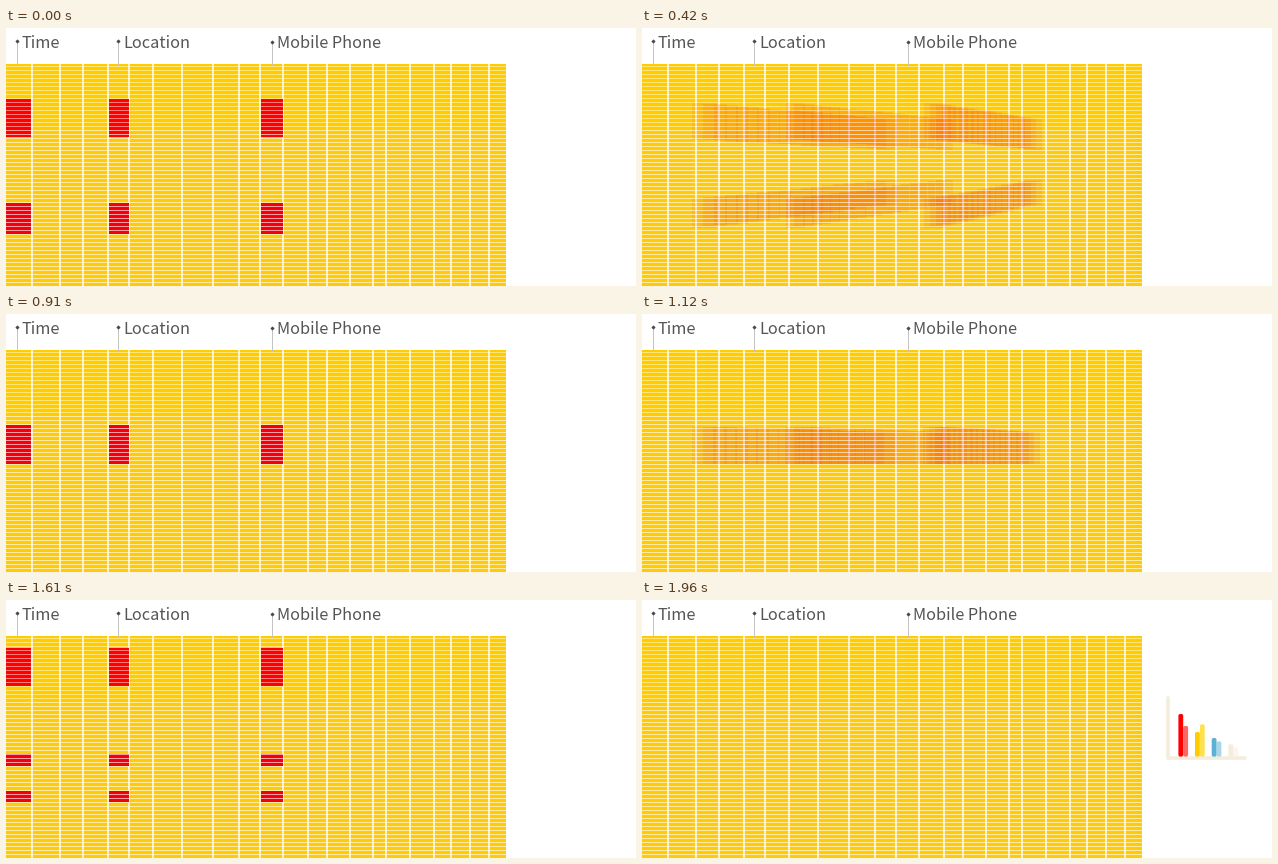
A matplotlib script that plays this animation: 630x258 px, repeating every 2240 ms.

```python
import numpy as np
import matplotlib.pyplot as plt
from matplotlib.animation import FuncAnimation
from matplotlib.patches import Circle, FancyBboxPatch, Rectangle, Wedge

W, H, DPI = 630, 258, 100
PX = 72 / DPI
YELLOW, RED, BLUE, BEIGE = "#ffcc00", "#ff0000", "#5bb1d6", "#f4ecdc"
TABLE_W, TABLE_TOP, SPLIT = 500, 36, 101

COLUMNS = [26, 54, 77, 102, 123, 147, 176, 207, 233, 254, 277,
           302, 321, 344, 367, 380, 404, 428, 445, 464, 483]
FIELDS = [(0, 25.4), (102.5, 122.6), (254.5, 276.5)]
LABELS = [("Time", 11, 12.5, 17), ("Location", 112, 12.5, 118),
          ("Mobile Phone", 266, 13.5, 272)]

fig = plt.figure(figsize=(W / DPI, H / DPI), dpi=DPI, facecolor="white")
ax = fig.add_axes([0, 0, 1, 1])
ax.set_xlim(0, W)
ax.set_ylim(H, 0)
ax.axis("off")


def rect(x0, y0, x1, y1, color, alpha=1, z=1):
    return ax.add_patch(Rectangle((x0, y0), x1 - x0, y1 - y0, fc=color,
                                  ec="none", lw=0, alpha=alpha, zorder=z))


def stroke(points, color, width):
    x, y = zip(*points)
    return ax.plot(x, y, color=color, lw=width * PX, zorder=5,
                   solid_capstyle="round", solid_joinstyle="round")[0]


def axes_lines():
    return [stroke([(525.5, 97.5), (525.5, 158.3), (603, 158.3)], BEIGE, 3.6)]


def line_chart():
    return axes_lines() + [
        stroke([(536, 147), (551, 127.5), (561, 134.5), (579, 119.5),
                (586, 123), (600, 123)], YELLOW, 4),
        stroke([(535, 122.5), (544.5, 123.5), (552.5, 142.5), (567, 143.5),
                (575.5, 138.5), (583.5, 142), (589, 135.5), (601, 139)], BLUE, 4),
        stroke([(534, 110.3), (563, 110.8), (568, 114), (575.5, 107.3),
                (580, 111), (594, 111), (600, 106.3)], RED, 4),
    ]


def donut_chart():
    center, radius = (560, 138.4), 35.5
    slices = [(-90, 37.5, RED), (37.5, 180, YELLOW), (180, 270, BEIGE)]
    parts = [Wedge(center, radius, a, b, fc=c, ec="none", zorder=5)
             for a, b, c in slices]
    parts.append(Circle(center, 15, fc="#f3f3f3", ec="none", zorder=6))
    return [ax.add_patch(p) for p in parts]


def bar_chart():
    parts = axes_lines()
    bars = [(536.4, 114, RED, 126, "#ff6666"),
            (553, 132, YELLOW, 124.3, "#ffe04d"),
            (569.7, 138, BLUE, 141.4, "#a5d8ea"),
            (586.4, 144.3, BEIGE, 147, "#faf6ee")]
    for x, top, color, top2, pale in bars:
        for left, y, c in [(x + 4.9, top2, pale), (x, top, color)]:
            box = FancyBboxPatch((left, y), 4.8, 156.6 - y, fc=c, ec="none",
                                 boxstyle="round,pad=0,rounding_size=1.8",
                                 zorder=5)
            parts.append(ax.add_patch(box))
    return parts


def draw_table():
    rect(0, TABLE_TOP, TABLE_W, SPLIT, YELLOW)
    rect(0, SPLIT, TABLE_W, 257.5, "#ffca0a")
    for x in COLUMNS:
        rect(x - 0.8, TABLE_TOP, x + 0.8, 257.5, "white", 0.75, 2)
    # row rules lie above the red cells so they tint with them
    for y in range(TABLE_TOP + 2, 257, 4):
        rect(0, y, TABLE_W, y + 1, "white", 0.48 if y < SPLIT else 0.62, 4)


def draw_labels():
    for text, x, y, left in LABELS:
        ax.plot([x, x], [y + 2, 35.5], color="#c4c4c4", lw=PX, zorder=1)
        ax.plot([x], [y], "D", color="#444444", ms=2.4 * PX, mew=0.4, zorder=2)
        ax.text(left - 1, 20, text, family="Noto Sans CJK JP",
                size=16.3 * PX, color="#555555", va="baseline")


# first step, row bands, chart and its centre
SCENES = [
    (0, 5, [(71, 109.2), (175.4, 206)], line_chart, (565, 128)),
    (13, 2, [(111, 150)], donut_chart, (560, 138.4)),
    (23, 2, [(48, 86), (154.4, 166), (191, 202)], bar_chart, (565, 128)),
]
# smear per flight step: path start, path end, copies, opacity
FLIGHT = [(0, 0.07, 8, 0.085), (0.09, 0.42, 18, 0.08), (0.47, 0.95, 22, 0.09)]


def draw_cells(bands, target, start=0, end=0, copies=1, alpha=1):
    parts = []
    for p in np.linspace(start, end, copies):
        k = 1 - 0.45 * p
        for y0, y1 in bands:
            color = RED if y0 < SPLIT else "#f2000e"
            for x0, x1 in FIELDS:
                cx = (x0 + x1) / 2 * (1 - p) + target[0] * p
                cy = (y0 + y1) / 2 * (1 - p) + target[1] * p
                w, h = (x1 - x0) * k / 2, (y1 - y0) * k / 2
                parts.append(rect(cx - w, cy - h, cx + w, cy + h,
                                  color, alpha, 3))
    return parts


live = []


def update(i):
    while live:
        live.pop().remove()
    first, hold, bands, chart, target = [s for s in SCENES if s[0] <= i][-1]
    step = i - first - hold
    if step < 0:
        live.extend(draw_cells(bands, target))
    elif step < len(FLIGHT):
        if step == 0:
            live.extend(draw_cells(bands, target, alpha=0.7))
        live.extend(draw_cells(bands, target, *FLIGHT[step]))
    else:
        live.extend(chart())
    return live


draw_table()
draw_labels()
anim = FuncAnimation(fig, update, frames=32, interval=70, repeat=True,
                     repeat_delay=0, blit=False)
plt.show()
```
